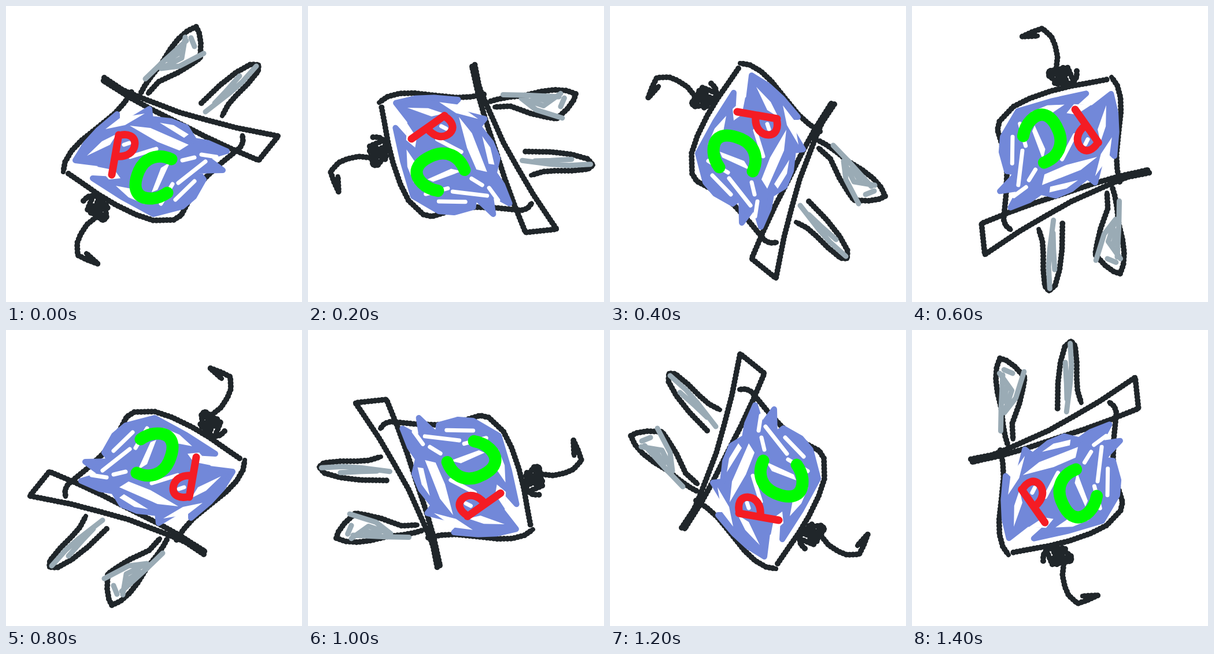
Recreate the animation shown at these times as an HTML page. Size 512 by 512 pixels, loop 1600 ms.

```html
<!DOCTYPE html>
<html lang="en">
<head>
<meta charset="utf-8">
<title>Spinning plug</title>
<style>
  html, body { margin: 0; width: 100%; height: 100%; overflow: hidden; background: #fff; }
  svg { display: block; width: 100%; height: 100%; }
  #plug { fill: none; stroke-linecap: round; stroke-linejoin: round; }
  .bumps { stroke-dasharray: 0 6; stroke-width: 10; }
</style>
</head>
<body>
<svg viewBox="0 0 512 512">
  <defs>
    <path id="lines" d="
      M234 149L240 138 251 122 268 101 284 75 298 57 314 43 329 36 334 46 337 64 336 90 322 100 298 115 264 131 246 151
      M338 168L370 137 398 115 423 101 437 102 436 113 418 135 398 155 384 171 374 190
      M170 124L200 144 212 150 245 163 300 184 350 198 400 211 471 225 437 267 390 247 345 226 300 203 250 178 212 157 168 129 188 138
      M217 149L205 167 188 186 160 209 130 233 113 251 102 270 99 287
      M108 290L130 305 160 326 190 344 225 361 255 371 290 370 303 362 311 347 327 317 346 296 372 272 405 245 410 235 409 224
      M134 337L141 330 154 327 168 340 142 350 173 344 176 349 146 358M150 330L141 352 168 371 174 366 172 350M160 334L152 356 170 362
      M155 366L140 378 129 395 123 410 124 431 140 439 159 446 139 428"/>
  </defs>
  <g id="plug">
    <g stroke="#20262a">
      <use href="#lines" stroke-width="8"/>
      <use href="#lines" class="bumps"/>
    </g>

    <path stroke="#9aabb5" stroke-width="9" d="
      M241 126L270 98 312 60M310 54L304 90 268 108 300 104 342 82M280 93L302 80M320 55L326 70
      M345 183L385 152 408 132 433 104M404 121L380 148 361 168 390 142"/>

    <path fill="#7288d9" stroke="#7288d9" stroke-width="10" d="
      M120 267L138 238 160 214 192 187 192 207 205 204 248 178 250 195 285 199 312 210 326 233 350 237
      382 251 345 262 375 284 330 285 342 300 325 330 305 347 255 360 200 330 150 298 185 300 160 272Z"/>
    <!-- paper showing through the scribble -->
    <path fill="#fff" d="
      M172 213L198 193 240 186 206 206ZM214 207L250 211 316 240 300 250 262 235ZM266 202L290 206 316 222 308 228Z
      M140 259L166 234 192 221 180 240ZM158 278L188 284 198 298 178 300ZM190 311L222 317 240 343 212 331Z
      M252 322L268 280 284 270 262 318Z"/>
    <path stroke="#fff" stroke-width="7" d="
      M268 342L288 308M293 335L326 303M298 306L345 269M338 257L364 261M215 261L260 247M204 240L213 237M305 267L326 262"/>

    <path stroke="#f41c24" stroke-width="13" d="M195 223L183 292M195 224C211 220 223 225 223 238C222 253 209 262 190 260"/>
    <path stroke="#00fc00" stroke-width="21" d="M286 265C262 254 240 263 230 285C216 318 228 333 250 333Q265 333 279 323"/>
  </g>
</svg>
<script>
  const plug = document.getElementById("plug");
  const LOOP = 1600, STEP = 200;

  function draw(now) {
    const turn = Math.floor(now % LOOP / STEP) * 45;
    plug.setAttribute("transform", `rotate(${turn} 256 256)`);
    requestAnimationFrame(draw);
  }
  draw(performance.now());
</script>
</body>
</html>
```
